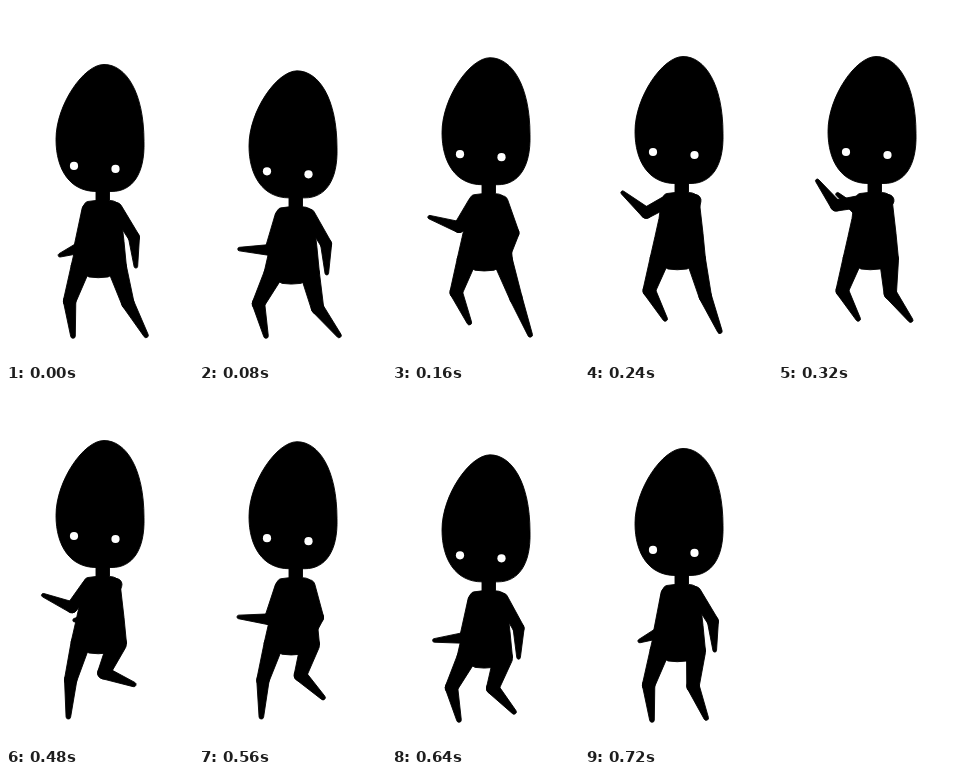
Write an HTML page with a canvas that moves like this. It is 187x356 px and loops after 0.76 s.

```html
<!DOCTYPE html>
<html lang="en">
<head>
<meta charset="utf-8">
<title>Walk cycle</title>
<style>
  html, body { margin: 0; width: 100%; height: 100%; overflow: hidden; background: #fff; }
  canvas { display: block; width: 187px; height: 356px; }
</style>
</head>
<body>
<canvas id="stage"></canvas>
<script>
const W = 187, H = 356, STEP = 80, LOOP = 760, STEPS = 10;
const canvas = document.getElementById('stage');
const ctx = canvas.getContext('2d');
const dpr = window.devicePixelRatio || 1;
canvas.width = W * dpr;
canvas.height = H * dpr;
ctx.scale(dpr, dpr);
ctx.lineWidth = 0.9;
ctx.lineJoin = 'round';

const ARM = [6, 5.5, 1.8], LEG = [9.5, 6.2, 2.3];
const head = new Path2D('M98 58C120 58 138 86 138 135C139 168 126 185 106 185' +
  'L90 185C64 185 50 163 50 133C50 98 78 58 98 58Z');
const torso = new Path2D('M90 180H103.5V194Q111 194 114 200L118 235L120.5 261' +
  'L102 270.5Q92 272 83 270.5L65 260L70 238L74 220L76 205Q78 195 82 195L90 194Z');

// Smooth peak of height 1 around step c, repeating with the loop.
function bell(s, c, spread) {
  const d = (s - c + 1.5 * STEPS) % STEPS - STEPS / 2;
  return Math.exp(-d * d / spread);
}

// Steep arch from step a to step b.
function arch(s, a, b) {
  return s > a && s < b ? Math.sqrt(Math.sin(Math.PI * (s - a) / (b - a))) : 0;
}

// Angles in degrees from straight down, positive to the right.
function polar([x, y], length, angle) {
  const a = angle * Math.PI / 180;
  return [x + length * Math.sin(a), y + length * Math.cos(a)];
}

function ink(path) {
  ctx.fill(path);
  ctx.stroke(path);
}

// Two circles joined by their outer tangents.
function taper([x1, y1], r1, [x2, y2], r2) {
  const dir = Math.atan2(y2 - y1, x2 - x1);
  const spread = Math.acos((r1 - r2) / Math.hypot(x2 - x1, y2 - y1));
  const path = new Path2D();
  path.arc(x1, y1, r1, dir + spread, dir - spread + 2 * Math.PI);
  path.arc(x2, y2, r2, dir - spread, dir + spread);
  path.closePath();
  ink(path);
}

function limb(root, joint, tip, r) {
  taper(root, r[0], joint, r[1]);
  taper(joint, r[1], tip, r[2]);
}

// The knee bends out further the closer the foot is to the hip.
function leg(hip, foot) {
  const dx = foot[0] - hip[0], dy = foot[1] - hip[1];
  const reach = Math.hypot(dx, dy);
  const bend = Math.max(0, 80 - reach) * 0.65 / reach;
  const knee = [hip[0] + dx / 2 - dy * bend, hip[1] + dy / 2 + dx * bend];
  limb(hip, knee, foot, LEG);
}

function leftArm(s, bob) {
  const swing = bell(s, 4.1, 5.3), tuck = bell(s, 9.5, 0.5);
  const shoulder = [82, 203 + bob];
  const elbow = [shoulder[0] - 8 - 16 * swing, shoulder[1] + 40 - 36 * swing];
  limb(shoulder, elbow, polar(elbow, 31 - 17 * tuck, -82 - 61 * swing + 25 * tuck), ARM);
}

function rightArm(s, bob) {
  const swing = bell(s, 4.6, 3.2);
  const shoulder = [110, 202 + bob];
  const elbow = polar(shoulder, 34 - 6 * swing, 32 - 97 * swing);
  limb(shoulder, elbow, polar(elbow, 29 + 8 * swing ** 2, 4 - 150 * swing), ARM);
}

function legs(s, bob) {
  const step = arch(s, 1, 6), land = arch(s, 5, 8);
  leg([74.5, 261 + bob], [67 + 13.5 * step - 5 * land, 330 - 17.5 * step - 3.5 * land]);

  const lift = bell(s, 5.7, 3.4);
  const travel = Math.min(1, Math.max(0, (s - 1.5) / 5));
  leg([111, 261 + bob], [140 - 19 * travel + 5 * lift, 329.5 - 36 * lift]);
}

function draw(s) {
  const bob = 16.5 * (bell(s, 0.7, 0.65) + bell(s, 8.3, 0.65)) - 7.5;
  ctx.fillStyle = '#fff';
  ctx.fillRect(0, 0, W, H);
  ctx.fillStyle = ctx.strokeStyle = '#000';
  leftArm(s, bob);
  rightArm(s, bob);
  legs(s, bob);

  ctx.save();
  ctx.translate(0, bob);
  ink(torso);
  ink(head);
  ctx.restore();

  // The eyes look up as the body rises.
  const gaze = bob * (bob < 0 ? 1.8 : 0.85);
  ctx.fillStyle = '#fff';
  for (const [x, y] of [[68, 159.5], [109.5, 162.5]]) {
    ctx.beginPath();
    ctx.arc(x, y + gaze, 4.1, 0, 2 * Math.PI);
    ctx.fill();
  }
}

const start = performance.now();
function tick() {
  draw(Math.floor((performance.now() - start) % LOOP / STEP));
  requestAnimationFrame(tick);
}
tick();
</script>
</body>
</html>
```
